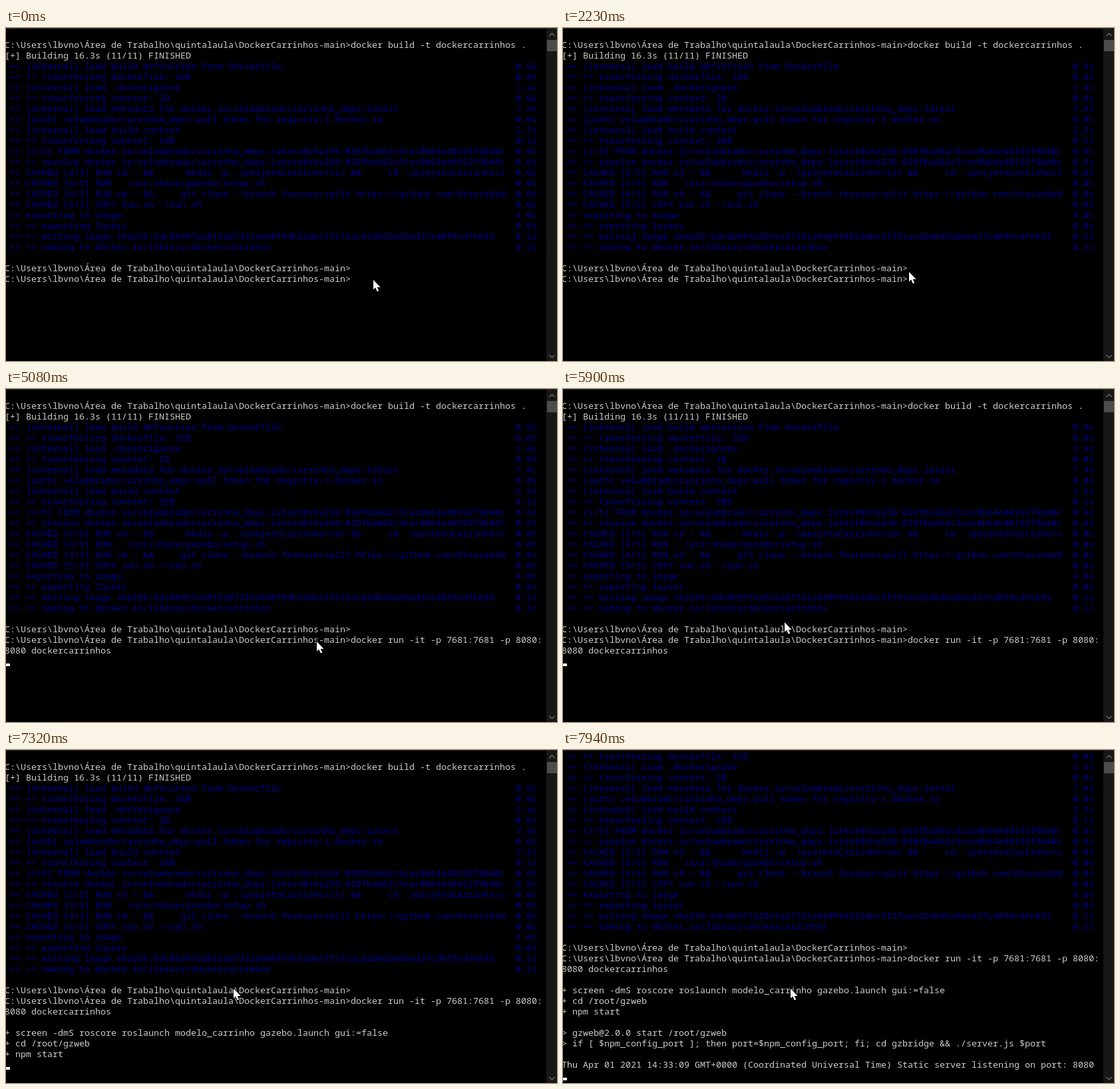
An HTML page with a canvas that plays this animation: 828 px wide and 501 px high, repeating every 8000 ms.

```html
<!DOCTYPE html>
<html lang="pt">
<head>
<meta charset="utf-8">
<title>Terminal</title>
<style>
  html, body { margin: 0; width: 100%; height: 100%; overflow: hidden; background: #000; }
  canvas { display: block; width: 828px; height: 501px; }
</style>
</head>
<body>
<canvas id="stage" width="828" height="501"></canvas>
<script>
const ctx = document.getElementById('stage').getContext('2d', { alpha: false });
const LOOP = 8000, CELL_W = 8, CELL_H = 16, LEFT = -2, TOP = 1;
const GREY = '#cccccc', NAVY = '#00008c';

const PROMPT = 'C:\\Users\\lbvno\\Área de Trabalho\\quintalaula\\DockerCarrinhos-main>';
const IMAGE = 'docker.io/velumbrado/carrinho_deps:latest';
const DIGEST = '@sha256:038fba862c5cac0b64e40192f9b40c';

const steps = [
  ['[internal] load build definition from Dockerfile', '0.9s'],
  ['=> transferring dockerfile: 32B', '0.0s'],
  ['[internal] load .dockerignore', '1.4s'],
  ['=> transferring context: 2B', '0.0s'],
  ['[internal] load metadata for ' + IMAGE, '7.4s'],
  ['[auth] velumbrado/carrinho_deps:pull token for registry-1.docker.io', '0.0s'],
  ['[internal] load build context', '2.5s'],
  ['=> transferring context: 28B', '0.1s'],
  ['[1/5] FROM ' + IMAGE + DIGEST, '0.8s'],
  ['=> resolve ' + IMAGE + DIGEST, '0.8s'],
  ['CACHED [2/5] RUN cd ~ &&      mkdir -p ./projetoCarrinho/src &&     cd ./projetoCarrinho/s', '0.0s'],
  ['CACHED [3/5] RUN . /usr/share/gazebo/setup.sh', '0.0s'],
  ['CACHED [4/5] RUN cd ~ &&     git clone --branch feature/split https://github.com/OtavioQrN', '0.0s'],
  ['CACHED [5/5] COPY run.sh ~/run.sh', '0.0s'],
  ['exporting to image', '4.0s'],
  ['=> exporting layers', '0.0s'],
  ['=> writing image sha256:6dc8b997a2015a87331a840f94b52dec5f2faacd2d6d5a66ad37cd0f9cdfe693', '0.1s'],
  ['=> naming to docker.io/library/dockercarrinhos', '0.1s']
];

// Every printed piece: row, column, text, time it appears, colour
const output = [];
const print = (row, text, at = 0, col = 0, color = GREY) =>
  output.push({ row, col, text, at, color });

print(1, PROMPT + 'docker build -t dockercarrinhos .');
print(2, '[+] Building 16.3s (11/11) FINISHED');
steps.forEach(([text, time], i) => {
  print(3 + i, '=> ' + text, 0, 1, NAVY);
  print(3 + i, time, 0, 96, NAVY);
});
print(22, PROMPT);
print(23, PROMPT);
print(23, 'docker run -it -p 7681:7681 -p 8080:', 2850, PROMPT.length);
print(24, '8080 dockercarrinhos', 2850);
print(26, '+ screen -dmS roscore roslaunch modelo_carrinho gazebo.launch gui:=false', 7120);
print(27, '+ cd /root/gzweb', 7120);
print(28, '+ npm start', 7120);
print(30, '> gzweb@2.0.0 start /root/gzweb', 7530);
print(31, '> if [ $npm_config_port ]; then port=$npm_config_port; fi; cd gzbridge && ./server.js $port', 7530);
print(33, 'Thu Apr 01 2021 14:33:09 GMT+0000 (Coordinated Universal Time) Static server listening on port: 8080', 7940);

// Step tracks: [start time, value...]
const scroll = [[0, 0], [7530, 3], [7940, 4]];
const caret = [
  [0], [1830, 23, PROMPT.length], [2230], [2850, 25, 0], [3270], [3870, 25, 0],
  [4480], [4880, 25, 0], [5480], [5900, 25, 0], [6520], [6920, 26, 0],
  [7120, 29, 0], [7530, 33, 0], [7940, 34, 0]
];
const pointer = [
  [0, 552, 379], [200, 521, 314], [400, 527, 331], [620, 527, 383],
  [1830, 526, 383], [2030, 521, 368], [2230, 520, 367], [5080, 467, 380],
  [5480, 316, 343], [5700, 331, 350], [5900, 333, 351], [7120, 338, 358],
  [7320, 342, 359]
];
const valueAt = (track, t) => track.findLast(([start]) => t >= start).slice(1);

function rect(color, x, y, w, h) {
  ctx.fillStyle = color;
  ctx.fillRect(x, y, w, h);
}

function drawText(first, t) {
  ctx.font = '13.333px "Noto Sans Mono", "DejaVu Sans Mono", monospace';
  ctx.textBaseline = 'alphabetic';
  for (const { row, col, text, at, color } of output) {
    if (t < at || row < first) continue;
    ctx.fillStyle = color;
    const y = TOP + (row - first) * CELL_H + 13;
    [...text].forEach((ch, i) => {
      if (ch !== ' ') ctx.fillText(ch, LEFT + (col + i) * CELL_W, y);
    });
  }
}

function chevron(y, dir) {
  ctx.beginPath();
  ctx.moveTo(816.5, y + 2 * dir);
  ctx.lineTo(820.5, y - 2 * dir);
  ctx.lineTo(824.5, y + 2 * dir);
  ctx.strokeStyle = '#676767';
  ctx.lineWidth = 1.5;
  ctx.stroke();
}

function drawScrollbar() {
  rect('#171717', 812, 1, 16, 500);
  rect('#4d4d4d', 813, 18, 15, 17);
  chevron(10, 1);
  chevron(494, -1);
}

const arrow = new Path2D('M0 0V14.6L3.2 11.6L5.8 17.5L8.2 16.5L5.7 10.9H10.6Z');

function drawPointer(x, y) {
  ctx.save();
  ctx.translate(x, y);
  ctx.strokeStyle = '#000';
  ctx.lineWidth = 2;
  ctx.stroke(arrow);
  ctx.fillStyle = '#fff';
  ctx.fill(arrow);
  ctx.restore();
}

function draw(t) {
  const [first] = valueAt(scroll, t);
  rect('#000', 0, 0, 828, 501);
  drawText(first, t);

  const [row, col] = valueAt(caret, t);
  if (row !== undefined) {
    rect('#fff', LEFT + col * CELL_W, TOP + (row - first + 1) * CELL_H - 4, CELL_W, 4);
  }

  rect(t < 1220 ? '#333333' : '#2b2b2b', 0, 0, 828, 1);
  drawScrollbar();
  drawPointer(...valueAt(pointer, t));
}

const start = performance.now();
function tick() {
  draw((performance.now() - start) % LOOP);
  requestAnimationFrame(tick);
}
tick();
</script>
</body>
</html>
```
